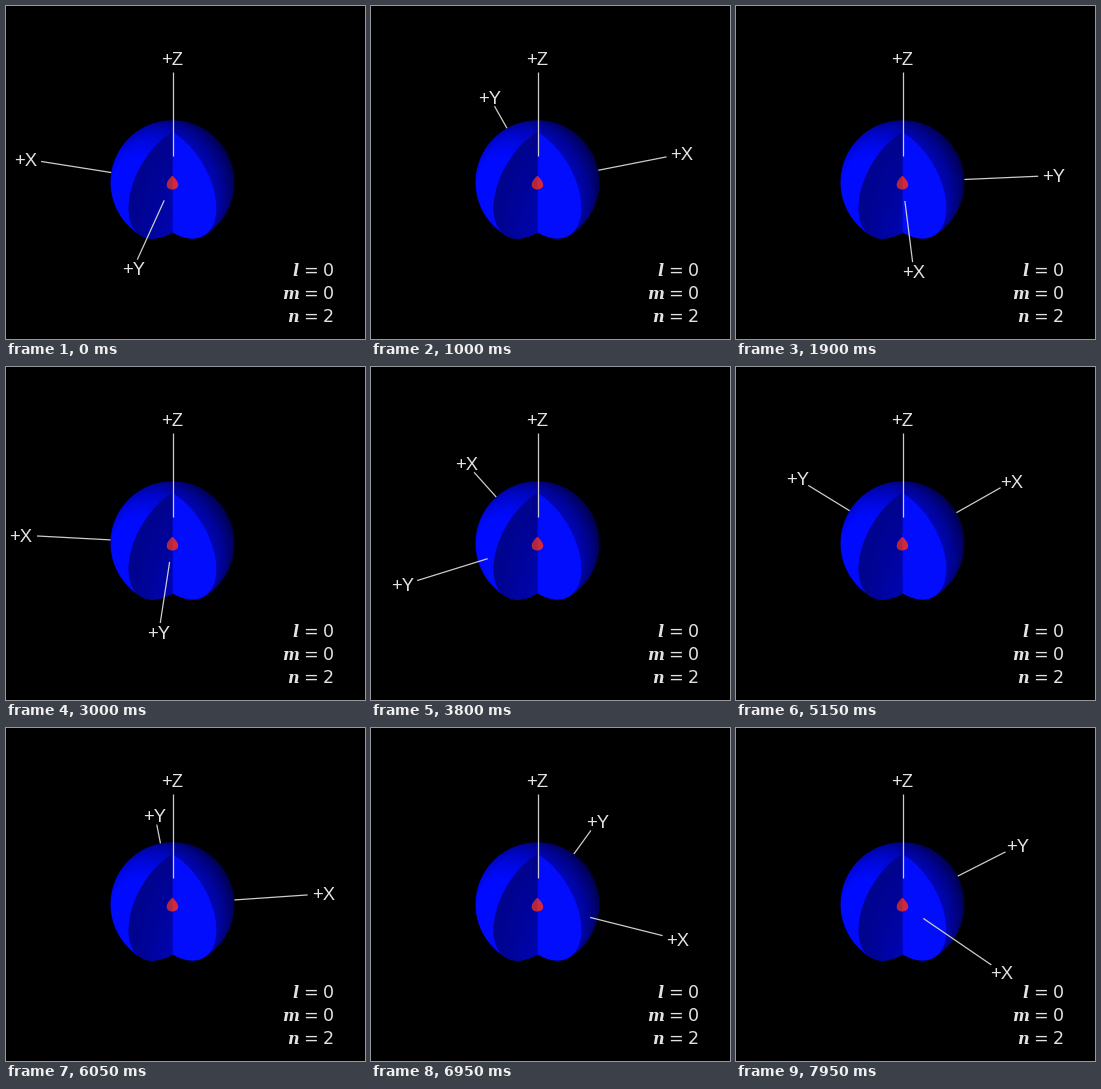
A matplotlib script for the animation above (8000 ms loop, 359x333 px).

```python
import numpy as np
import matplotlib.pyplot as plt
from matplotlib.animation import FuncAnimation
from matplotlib.patches import Polygon, Rectangle

W, H, DPI = 359, 333, 100
STEP, FRAMES = 50, 160
CX, CY, R = 166.5, 176.2, 62.0
AXIS = 152.0                      # distance from centre to a label
TILT = np.radians(36.1)           # camera elevation
SIN, COS = np.sin(TILT), np.cos(TILT)
INNER, OUTER = 0.21, 0.895        # visible part of each axis
START, SWEEP, DECAY = -105, 667, 4.03
PALE, INK = "#cccccc", "#e2e2e2"

GY, GX = np.mgrid[0:H, 0:W] + 0.5


def px(size):
    return size * 72 / DPI


def ground(angle, length=AXIS):
    """Screen offset of a horizontal vector; angle 0 faces the viewer."""
    return length * np.sin(angle), length * np.cos(angle) * SIN


def meridian(side, start=90, stop=-90):
    """Edge of the cut on the left (-1) or right (+1)."""
    th = np.radians(np.linspace(start, stop, 80))
    x, y = ground(side * np.pi / 4, R * np.cos(th))
    return np.column_stack([CX + x, CY + y - R * COS * np.sin(th)])


def teardrop(stop):
    t = np.linspace(0, stop, 60)
    return np.column_stack([CX - 7.4 * np.sin(t) * np.sin(t / 2),
                            CY + 0.4 - 6.8 * np.cos(t)])


def blue(light):
    return np.dstack([0 * light, 0.04 * light ** 2, light])


def ball():
    x, y = (GX - CX) / R, (GY - CY) / R
    r = np.hypot(x, y)
    z = np.sqrt(np.clip(1 - r * r, 0, 1))
    light = np.clip(0.58 - 0.33 * x + 0.17 * y + 0.42 * z, 0, 1)
    return blue(light * np.clip((1 - r) * R + 0.5, 0, 1))


def shaded_face():
    across = np.clip(1 + (GX - CX) / 44, 0, 1)
    down = np.clip((GY - CY + 50) / 100, 0, 1)
    return blue(0.54 + 0.16 * across * down)


fig = plt.figure(figsize=(W / DPI, H / DPI), dpi=DPI, facecolor="black")
ax = fig.add_axes([0, 0, 1, 1])


def paint(image, z):
    return ax.imshow(image, extent=(0, W, H, 0), interpolation="nearest",
                     aspect="auto", zorder=z)


def shape(points, color, z):
    return ax.add_patch(Polygon(points, closed=True, fc=color, ec="none", zorder=z))


paint(ball(), 1)
face_image = paint(shaded_face(), 4)
ax.set_xlim(0, W)
ax.set_ylim(H, 0)
ax.axis("off")

# Open underside of the cut, then its two faces and the small inner lobe
underside = [meridian(-1, -44, -90), meridian(1, -90, -44),
             [(CX + 34, CY + 65), (CX - 34, CY + 65)]]
shape(np.vstack(underside), "black", 2)
face_image.set_clip_path(shape(meridian(-1), "#02068c", 3))
shape(meridian(1), "#020dfd", 3)
shape(teardrop(2 * np.pi), "#d0283c", 5)
shape(teardrop(np.pi), "#b02840", 6)

window = Rectangle((5, 0), 323.5, H, transform=ax.transData)


def label(text, x=0, y=0):
    t = ax.text(x, y, text, family="Liberation Sans", size=px(18.5), color=INK,
                ha="center", va="center_baseline", zorder=8)
    t.set_clip_path(window)
    return t


def axis_line():
    return ax.plot([], [], color=PALE, lw=px(1.25), solid_capstyle="butt", zorder=7)[0]


z_top = AXIS * COS
axis_line().set_data([CX, CX], [CY - z_top * INNER, CY - z_top * OUTER])
label("+Z", CX, CY - z_top - 0.5)

for row, (name, value) in enumerate(zip("lmn", "002")):
    y = 270 + 23 * row
    ax.text(292.5, y, name, family="DejaVu Serif", style="italic", weight="bold",
            size=px(16), color=INK, ha="right", va="baseline", zorder=8)
    for s, x in (("=", 304.3), (value, 322)):
        ax.text(x, y, s, family="DejaVu Sans", size=px(17.5), color=INK,
                ha="center", va="baseline", zorder=8)

arms = [(axis_line(), label("+X"), 0), (axis_line(), label("+Y"), np.pi / 2)]


def first_visible(angle, dx, dy):
    """Fraction of the axis where it comes out of the ball."""
    c = np.cos(angle)
    if c > np.cos(np.pi / 4):
        return INNER
    if c > 0:
        return R / AXIS - 0.08 * c
    return R / np.hypot(dx, dy)


def draw(i):
    t = i * STEP / 1000
    spin = np.radians(START - SWEEP * (1 - np.exp(-t / DECAY)))
    for line, text, offset in arms:
        a = spin + offset
        dx, dy = ground(a)
        k = np.array([first_visible(a, dx, dy), OUTER])
        line.set_data(CX + dx * k, CY + dy * k)
        text.set_position((CX + dx, CY + dy))
    return [item for arm in arms for item in arm[:2]]


anim = FuncAnimation(fig, draw, frames=FRAMES, interval=STEP, repeat=True,
                     repeat_delay=0, blit=False)
plt.show()
```
